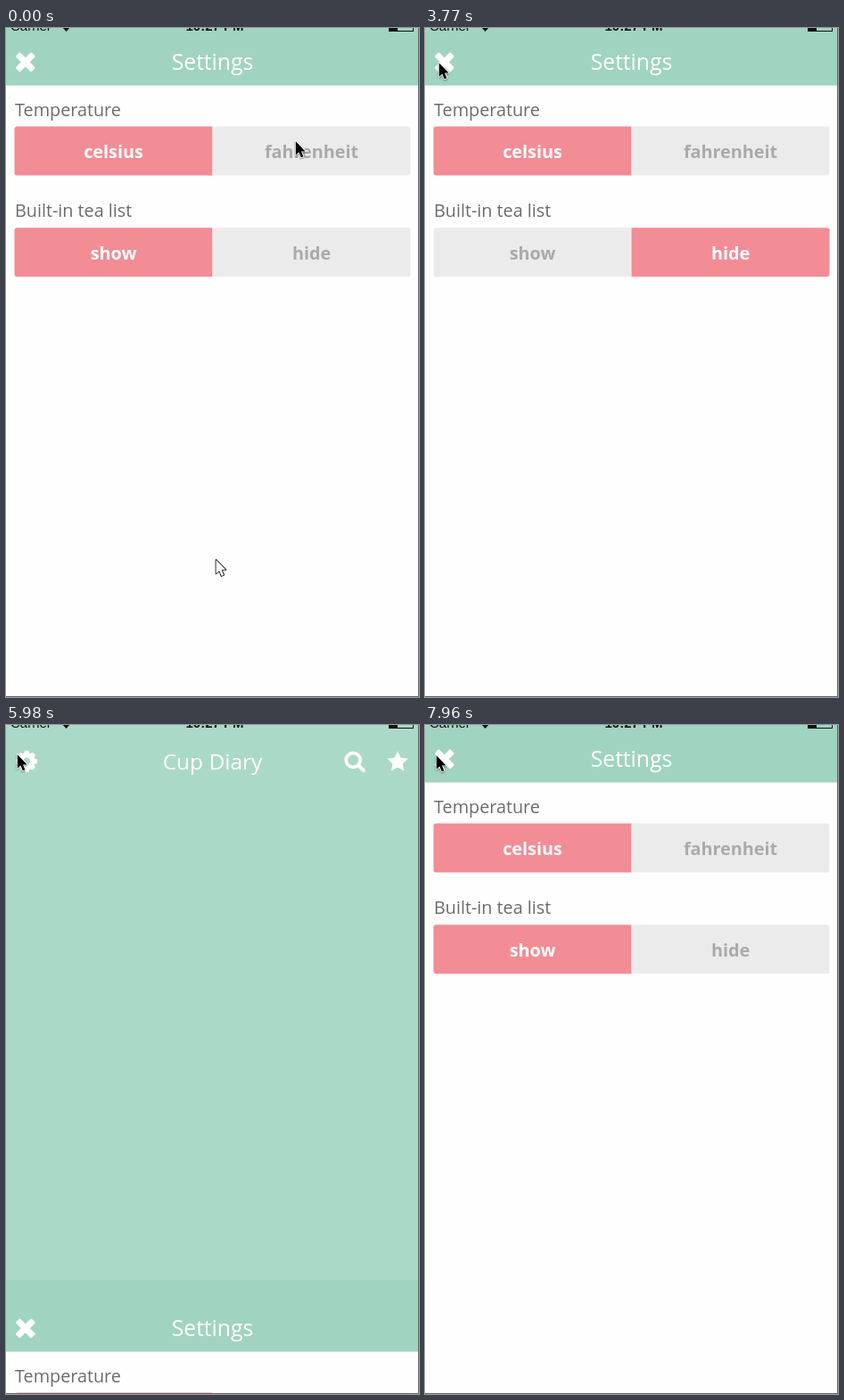
An HTML page with a canvas that plays this animation: 463x751 px, repeating every 8 s.

```html
<!DOCTYPE html>
<html lang="en">
<head>
<meta charset="utf-8">
<title>Tea settings</title>
<style>
  html, body { margin: 0; width: 100%; height: 100%; overflow: hidden; background: #fefefe; }
  canvas { display: block; width: 463px; height: 751px; }
</style>
</head>
<body>
<canvas id="stage"></canvas>
<script>
const W = 463, H = 751, MID = 231.5, LOOP = 8000;
const BAR = 64.5, TRAVEL = 767, BEAT = 270, ROW = 179.7;
const MINT = '#a0d4c0', PINK = '#f28c95', PALE = '#ebebeb', PAPER = '#fefefe';
const LEAF = '#94da62', TILE = '#dfdfdf', INK = '#111';
const SANS = '"Open Sans", "Noto Sans", sans-serif';
const STATUS = '"Liberation Sans", Arial, sans-serif';
const TEAS = ['Baihao Silver Needle white tea', 'Bi Luo Chun green tea', 'Dragon Well', 'Lapsang Souchong'];

// The picture moves in beats, which start afresh at these times
const RESTARTS = [0, 520, 1490, 3770, 3900, 5420, 6380, 7960];

// Stops of the pointer, joined by straight moves
const STOPS = [
  { t: 270, x: 324, y: 126 },   // fahrenheit
  { t: 790, x: 122, y: 143 },   // celsius
  { t: 2030, x: 122, y: 143 },
  { t: 2570, x: 330, y: 245 },  // hide
  { t: 2840, x: 330, y: 245 },
  { t: 3770, x: 15, y: 38 },    // close
  { t: 4170, x: 80, y: 138 },
  { t: 4440, x: 195, y: 400 },
  { t: 4710, x: 214, y: 515 },
  { t: 5420, x: 18, y: 34 },    // gear
  { t: 5960, x: 12, y: 32 },
  { t: 6230, x: 99, y: 75 },
  { t: 6920, x: 106, y: 265 },  // show
  { t: 7190, x: 106, y: 265 },
  { t: 7730, x: 16, y: 5 },
  { t: 7960, x: 12, y: 33 }     // close
];

const canvas = document.getElementById('stage');
const c = canvas.getContext('2d');
const ratio = window.devicePixelRatio || 1;
canvas.width = Math.round(W * ratio);
canvas.height = Math.round(H * ratio);

const clamp = v => Math.min(1, Math.max(0, v));
const mix = (a, b, u) => a + (b - a) * u;

function easeOut(t, start, length) {
  return 1 - (1 - clamp((t - start) / length)) ** 2;
}

function heldTime(t) {
  const start = RESTARTS.findLast(r => r <= t);
  return start + Math.floor((t - start) / BEAT) * BEAT;
}

function pointerAt(t) {
  const next = STOPS.findIndex(s => s.t > t);
  if (next === 0) return STOPS[0];
  if (next < 0) return STOPS.at(-1);
  const a = STOPS[next - 1], b = STOPS[next];
  const u = (t - a.t) / (b.t - a.t);
  return { x: mix(a.x, b.x, u), y: mix(a.y, b.y, u) };
}

function rect(x, y, w, h, color) {
  c.fillStyle = color;
  c.fillRect(x, y, w, h);
}

function text(str, x, y, size, color, { weight = 400, align = 'center', family = SANS } = {}) {
  c.font = `${weight} ${size}px ${family}`;
  c.textAlign = align;
  c.fillStyle = color;
  c.fillText(str, x, y);
}

function polygon(points) {
  c.beginPath();
  points.forEach(([x, y]) => c.lineTo(x, y));
  c.closePath();
}

function fill(color) {
  c.fillStyle = color;
  c.fill();
}

function stroke(color, width) {
  c.strokeStyle = color;
  c.lineWidth = width;
  c.stroke();
}

function at(x, y, paint) {
  c.save();
  c.translate(x, y);
  paint();
  c.restore();
}

function line(x1, y1, x2, y2, width, color, cap = 'round') {
  c.beginPath();
  c.moveTo(x1, y1);
  c.lineTo(x2, y2);
  c.lineCap = cap;
  stroke(color, width);
}

function ellipse(x, y, rx, ry, color, turn = 0) {
  c.beginPath();
  c.ellipse(x, y, rx, ry, turn, 0, 7);
  fill(color);
}

function shadow(alpha, blur, dx, dy) {
  c.shadowColor = `rgba(0,0,0,${alpha})`;
  c.shadowBlur = blur * ratio;
  c.shadowOffsetX = dx * ratio;
  c.shadowOffsetY = dy * ratio;
}

function crossIcon(x, y) {
  at(x, y, () => {
    c.rotate(Math.PI / 4);
    for (let i = 0; i < 2; i++) {
      c.beginPath();
      c.roundRect(-12.5, -3.5, 25, 7, 1.5);
      fill('#fff');
      c.rotate(Math.PI / 2);
    }
  });
}

function gearIcon(x, y) {
  at(x, y, () => {
    c.beginPath();
    c.arc(0, 0, 9.6, 0, 7);
    c.arc(0, 0, 4, 7, 0, true);
    fill('#fff');
    for (let i = 0; i < 8; i++) {
      polygon([[-3.2, -8.5], [-2.2, -12], [2.2, -12], [3.2, -8.5]]);
      fill('#fff');
      c.rotate(Math.PI / 4);
    }
  });
}

function searchIcon(x, y) {
  c.beginPath();
  c.arc(x - 1.8, y - 1.8, 8, 0, 7);
  stroke('#fff', 3.8);
  line(x + 4.5, y + 4.5, x + 10, y + 10, 4.2, '#fff');
}

function starIcon(x, y) {
  const points = [];
  for (let i = 0; i < 10; i++) {
    const r = i % 2 ? 6 : 12.4, a = i * Math.PI / 5 - Math.PI / 2;
    points.push([x + r * Math.cos(a), y + r * Math.sin(a)]);
  }
  polygon(points);
  fill('#fff');
}

function leafPath(tipX, tipY, left, right, midY, baseX, baseY) {
  c.beginPath();
  c.moveTo(tipX, tipY);
  c.bezierCurveTo(tipX - 12, tipY + 20, left, midY - 28, left, midY);
  c.bezierCurveTo(left, midY + 18, baseX - 24, baseY, baseX, baseY);
  c.bezierCurveTo(baseX + 22, baseY, right, midY + 22, right, midY);
  c.bezierCurveTo(right, midY - 26, tipX + 14, tipY + 14, tipX, tipY);
  c.closePath();
}

function leaves(y) {
  at(0, y, () => {
    c.lineJoin = 'round';
    leafPath(211, 47, 171, 240, 99, 206, 119);
    stroke(LEAF, 7);
    line(206, 88, 205, 140, 6.5, LEAF);
    leafPath(246, 27, 215, 288, 78, 250, 116);
    stroke(TILE, 5);
    fill(LEAF);
    line(252, 98, 250, 122, 11, TILE, 'butt');
    line(253, 86, 251, 126, 6, LEAF);
  });
}

function seeded(seed) {
  return () => (seed = (seed * 16807) % 2147483647) / 2147483647;
}

function sliver(x, y, length, width, turn, color) {
  at(x, y, () => {
    c.rotate(turn);
    c.beginPath();
    c.moveTo(-length, 0);
    c.quadraticCurveTo(0, -width, length, 0);
    c.quadraticCurveTo(0, width, -length, 0);
    fill(color);
  });
}

// Soft stand-in for a dish of green tea
function teaDish(y) {
  at(0, y, () => {
    c.beginPath();
    c.rect(-4, 0, 470, 178.5);
    c.clip();
    const back = c.createLinearGradient(0, 0, W, 0);
    back.addColorStop(0, '#dad7cd');
    back.addColorStop(1, '#e2e4df');
    rect(-4, 0, 470, 180, back);
    ellipse(425, 106, 56, 22, '#bd9c6b', .35);
    ellipse(143, 30, 42, 19, '#dcc0a0', .1);
    ellipse(405, 122, 18, 20, '#a9824f');
    c.beginPath();
    c.ellipse(242, 130, 204, 128, 0, 0, 7);
    fill('rgba(235,235,230,.3)');
    stroke('#f0f0ec', 3);

    const rnd = seeded(41);
    ellipse(230, 160, 148, 128, '#5f6d1e');
    for (let i = 0; i < 300; i++) {
      const side = rnd() * 2 - 1;
      const top = 18 + 125 * Math.abs(side) ** 2.2;
      const depth = mix(top, 185, (i + rnd() * 60) / 360);
      const tone = `hsl(${64 + rnd() * 9}, 53%, ${22 + rnd() * 24}%)`;
      sliver(228 + side * 158, depth, 13 + rnd() * 15, 5 + rnd() * 7, rnd() * 2.6 - 1.5, tone);
    }
  });
}

function teaList() {
  rect(-4, BAR, 470, TRAVEL, '#fff');
  TEAS.forEach((name, i) => {
    const y = 65 + ROW * i;
    if (name === 'Dragon Well') {
      teaDish(y);
    } else {
      rect(-4, y, 470, 178.5, TILE);
      leaves(y);
    }
    c.save();
    shadow(.75, 4, 2, 2);
    text(name, MID, y + 99, 25, '#fff', { weight: 700 });
    c.restore();
  });
}

function home(progress, listed) {
  const scale = 1 - .056 * progress;
  c.save();
  c.translate(MID, H / 2);
  c.scale(scale, scale);
  c.translate(-MID, -H / 2);
  rect(-4, -16, 470, 783, MINT);
  if (listed) teaList();
  text('Cup Diary', MID, 47, 24.7, '#fff');
  gearIcon(21.2, 37.6);
  searchIcon(392.5, 38);
  starIcon(441, 38.4);
  c.restore();
  // Fade towards the white behind the page
  c.globalAlpha = .7 * progress;
  rect(0, 0, W, H, PAPER);
  c.globalAlpha = 1;
}

function option(label, x, y, active, corners) {
  c.beginPath();
  c.roundRect(x, y, 222, 55, corners);
  fill(active ? PINK : PALE);
  text(label, x + 111, y + 35.5, 19.8, active ? '#fff' : '#aaa', { weight: 700 });
}

function choice(title, labels, y, first) {
  text(title, 10, y - 12, 19.8, '#6b6b6b', { align: 'left' });
  option(labels[0], 9.5, y, first, [3, 0, 0, 3]);
  option(labels[1], 231.5, y, !first, [0, 3, 3, 0]);
}

function settings(offset, celsius, shown) {
  at(0, offset, () => {
    rect(0, -16, W, H + 16, PAPER);
    rect(0, -16, W, BAR + 16, MINT);
    crossIcon(21.8, 38.3);
    text('Settings', MID, 47, 24.7, '#fff');
    choice('Temperature', ['celsius', 'fahrenheit'], 110.5, celsius);
    choice('Built-in tea list', ['show', 'hide'], 224.3, shown);
  });
}

function statusBar() {
  text('Carrier', 5, 3, 15, INK, { align: 'left', family: STATUS });
  text('10:27 PM', 234, 3, 15, INK, { weight: 700, family: STATUS });
  polygon([[62, -2], [73, -2], [67.5, 4]]);
  fill(INK);
  c.lineWidth = 1;
  c.strokeStyle = INK;
  c.strokeRect(429.5, -7.5, 27, 11);
  rect(430, -7, 9, 10, INK);
}

function arrow(x, y, scale, inside, edge, width) {
  at(x, y, () => {
    c.scale(scale, scale);
    polygon([[0, 0], [0, 18], [4.2, 14.2], [7, 21], [10, 19.7], [7.2, 13], [12.6, 13]]);
    c.lineJoin = 'round';
    stroke(edge, width);
    fill(inside);
  });
}

function pointer({ x, y }) {
  c.save();
  shadow(.35, 2, 0, 1);
  arrow(x + .8, y + 1.2, .86, '#000', '#fff', 2);
  c.restore();
  arrow(x + .8, y + 1.2, .86, '#000', '#fff', 1.6);
}

function draw(t) {
  const now = heldTime(t);
  const closing = easeOut(now, 3846, 320);
  const opening = easeOut(now, 5920, 460);
  const offset = Math.round(TRAVEL * (closing - opening));
  const celsius = now < 270 || now >= 1490;
  const shown = now < 2840 || now >= 7190;

  c.setTransform(ratio, 0, 0, ratio, 0, 0);
  rect(0, 0, W, H, PAPER);
  if (offset > 0) home(1 - offset / TRAVEL, now < 4440);
  if (offset < TRAVEL) settings(offset, celsius, shown);
  statusBar();
  rect(462, 0, 1, H, '#666');
  rect(0, 750, W, 1, '#666');
  if (t < 130) arrow(235.5, 597, .86, '#fff', INK, 2);
  pointer(pointerAt(now));
}

function tick() {
  draw(performance.now() % LOOP);
  requestAnimationFrame(tick);
}
tick();
</script>
</body>
</html>
```
